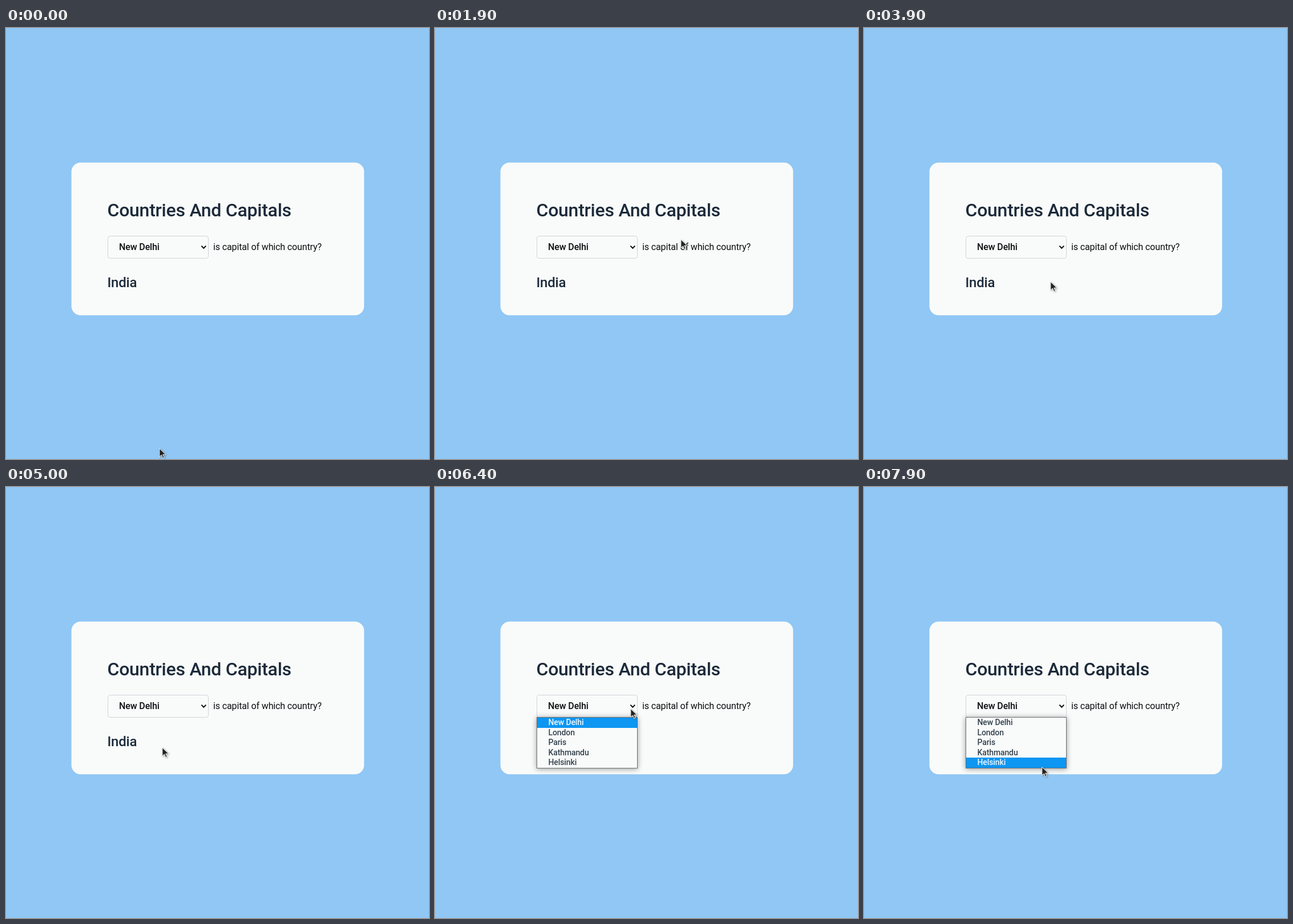
Animation, 741 px wide and 755 px high, one loop 8 s. Source, as an HTML page:

```html
<!DOCTYPE html>
<html lang="en">
<head>
<meta charset="utf-8">
<title>Countries And Capitals</title>
<style>
  html, body { margin: 0; width: 100%; height: 100%; overflow: hidden; background: #90c7f5; }
  svg { display: block; width: 741px; height: 755px; font-family: Roboto, sans-serif; }
  text { letter-spacing: -.008em; }
  .card, .field, .menu { fill: #f9fbfa; }
  .field { stroke: #ced4da; }
  .menu { stroke: #6b6f73; filter: drop-shadow(0 1px 5px rgba(0, 0, 0, .4)); }
  .head { font-weight: 500; fill: #1c2a3a; }
  .body { font-size: 16px; fill: #0b0d10; }
  .bold { font-weight: 500; }
  .option { font-size: 14px; font-weight: 500; fill: #33414d; }
  .option.on { fill: #f2f9ff; }
  #bar { fill: #0d96f2; }
  #cursor { fill: #222; stroke: #fff; filter: drop-shadow(1px 1px 1.5px rgba(0, 0, 0, .4)); }
</style>
</head>
<body>
<svg viewBox="0 0 741 755">
  <rect class="card" x="114.6" y="235.7" width="512.7" height="267.6" rx="16"/>
  <text class="head" x="177.5" y="330" font-size="32">Countries And Capitals</text>
  <rect class="field" x="178.5" y="364.5" width="176" height="39" rx="4"/>
  <text class="body bold" x="198" y="389">New Delhi</text>
  <path d="M342.3 381.6l4 4.2 4-4.2" fill="none" stroke="#111" stroke-width="2"/>
  <text class="body" x="363" y="389">is capital of which country?</text>
  <text class="head" x="177.5" y="454" font-size="24">India</text>
  <g id="popup">
    <rect class="menu" x="178.5" y="403.5" width="176" height="89"/>
    <rect id="bar" x="179" width="175"/>
  </g>
  <path id="cursor" d="M.8 1.5V16.3l3.6-3.3 2.4 5.6 2.4-1-2.4-5.4H11.8z"/>
</svg>
<script>
const LOOP = 8000, STEP = 100, OPEN = 6400;
const $ = id => document.getElementById(id);
const popup = $('popup'), bar = $('bar'), cursor = $('cursor');

// pointer strokes: x, y, travel ms, rest ms
const strokes = [
  [268, 735, 0, 400],
  [295, 540, 400], [248, 380, 400, 100],
  [209, 346, 300], [430, 369, 300], [492, 378, 300],
  [202, 366, 500], [430, 398, 400], [497, 398, 400, 100],
  [326, 443, 300], [239, 445, 100, 100],
  [124, 464, 300], [220, 454, 300, 100],
  [122, 443, 100], [273, 455, 100, 100],
  [342, 387, 700, 900],
  [323, 437, 300, 100], [324, 460, 100, 100],
  [317, 473, 200, 100], [311, 489, 300]
];

function tipAt(t) {
  let [px, py] = strokes[0];
  for (const [x, y, travel, rest = 0] of strokes) {
    if (t < travel) {
      const k = t / travel;
      return [Math.round(px + (x - px) * k), Math.round(py + (y - py) * k)];
    }
    t -= travel + rest;
    [px, py] = [x, y];
    if (t < 0) break;
  }
  return [px, py];
}

const edge = row => Math.round(404 + 17.6 * row);

const options = ['New Delhi', 'London', 'Paris', 'Kathmandu', 'Helsinki'].map((name, i) => {
  const el = document.createElementNS('http://www.w3.org/2000/svg', 'text');
  el.textContent = name;
  el.setAttribute('x', 198.5);
  el.setAttribute('y', edge(i) + 13);
  popup.append(el);
  return el;
});

function draw(now) {
  const t = Math.floor(now % LOOP / STEP) * STEP;
  const [x, y] = tipAt(t);
  cursor.setAttribute('transform', `translate(${x} ${y})`);
  popup.style.display = t < OPEN ? 'none' : '';

  // the row under the pointer lights up
  const row = Math.max(0, options.findLastIndex((_, i) => edge(i) <= y));
  bar.setAttribute('y', edge(row));
  bar.setAttribute('height', edge(row + 1) - edge(row));
  options.forEach((el, i) => el.setAttribute('class', i === row ? 'option on' : 'option'));
}

const start = performance.now();
function tick() {
  draw(performance.now() - start);
  requestAnimationFrame(tick);
}
tick();
</script>
</body>
</html>
```
